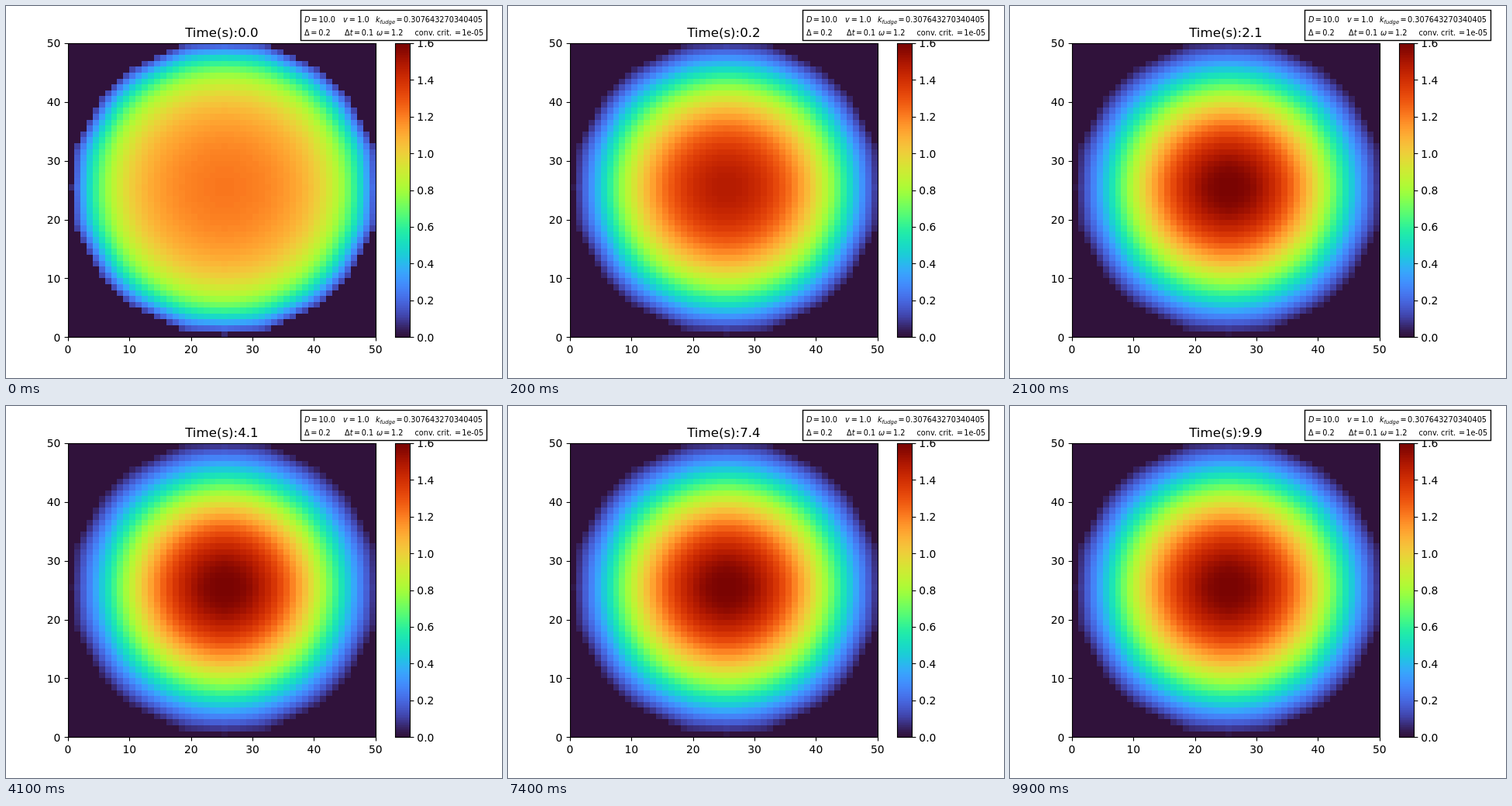
These frames come from a looping animation (640x480 px, 10 s). An HTML page with a canvas:

```html
<!DOCTYPE html>
<html>
<head>
<meta charset="utf-8">
<style>
  html, body { margin: 0; width: 640px; height: 480px; overflow: hidden; background: #fff; }
  canvas { display: block; }
</style>
</head>
<body>
<canvas id="stage" width="640" height="480"></canvas>
<script>
const ctx = document.getElementById('stage').getContext('2d');
const LEFT = 80, RIGHT = 476.8, TOP = 48, BOTTOM = 427.2;
const CELLS = 50, VMAX = 1.6;
const CELL_W = (RIGHT - LEFT) / CELLS, CELL_H = (BOTTOM - TOP) / CELLS;
const BAR_L = 502, BAR_R = 521;

// Turbo colour map, smoothed through evenly spaced stops
const stops = ('30123b 4145ab 4675ed 39a2fc 1bcfd4 24eca6 61fc6c a4fc3b ' +
  'd1e834 f3c63a fe9b2d f36315 d93806 b11901 7a0402').split(' ')
  .map(h => [0, 2, 4].map(i => parseInt(h.slice(i, i + 2), 16)));
const stop = i => stops[Math.max(0, Math.min(stops.length - 1, i))];
const palette = Array.from({ length: 256 }, (_, n) => {
  const x = n / 255 * (stops.length - 1), i = Math.min(Math.floor(x), stops.length - 2), u = x - i;
  const rgb = [0, 1, 2].map(c => {
    const [a, b, d, e] = [-1, 0, 1, 2].map(k => stop(i + k)[c]);
    return Math.round(b + u / 2 * (d - a + u * (2 * a - 5 * b + 4 * d - e + u * (3 * (b - d) + e - a))));
  });
  return `rgb(${rgb})`;
});
const colour = v => palette[Math.max(0, Math.min(255, Math.floor(v / VMAX * 256)))];

// Implicit diffusion in a disc of radius 25 cells, solved by over-relaxation
const W = 53, DT = 0.1, COUPLING = 10 / 0.2 ** 2, OMEGA = 1.7;
const at = (x, y) => (y + 1) * W + x + 1;
const disc = [];
for (let y = 0; y <= 50; y++)
  for (let x = 0; x <= 50; x++)
    if ((x - 25) ** 2 + (y - 25) ** 2 <= 625) disc.push(at(x, y));

function step(old, gain) {
  const phi = old.slice(), diag = 1 / DT + 4 * COUPLING - gain;
  let change = 1;
  for (let n = 0; n < 400 && change > 1e-8; n++) {
    change = 0;
    for (const i of disc) {
      const sum = phi[i - 1] + phi[i + 1] + phi[i - W] + phi[i + W];
      const d = OMEGA * ((old[i] / DT + COUPLING * sum) / diag - phi[i]);
      phi[i] += d;
      change = Math.max(change, Math.abs(d));
    }
  }
  return phi;
}

function run(steps, gain) {
  let phi = new Float64Array(W * W);
  for (const i of disc) phi[i] = 1;
  return Array.from({ length: steps }, () => phi = step(phi, gain));
}

// Adjust the gain so that the final shape neither grows nor decays
const trial = run(20, 2.25), mid = at(25, 25);
const fields = run(24, 2.25 + (trial[18][mid] / trial[19][mid] - 1) / DT);

function text(s, x, y, size, align = 'left', style = '') {
  ctx.font = `${style} ${size}px "DejaVu Sans", sans-serif`;
  ctx.textAlign = align;
  ctx.fillStyle = '#000';
  ctx.fillText(s, x, y);
}

function line(x1, y1, x2, y2) {
  ctx.beginPath();
  ctx.moveTo(x1, y1);
  ctx.lineTo(x2, y2);
  ctx.stroke();
}

function drawField(phi) {
  const px = i => Math.round(LEFT + i * CELL_W), py = j => Math.round(BOTTOM - j * CELL_H);
  for (let j = 0; j < CELLS; j++)
    for (let i = 0; i < CELLS; i++) {
      ctx.fillStyle = colour(phi[at(i, j)]);
      ctx.fillRect(px(i), py(j + 1), px(i + 1) - px(i), py(j) - py(j + 1));
    }
}

function drawAxes() {
  const size = 13.89;
  ctx.strokeStyle = '#000';
  ctx.lineWidth = 1.11;
  ctx.strokeRect(80.5, 48.5, 397, 379);
  for (let k = 0; k <= 5; k++) {
    const x = LEFT + k * 10 * CELL_W, y = BOTTOM - k * 10 * CELL_H;
    const sx = Math.round(x) + 0.5, sy = Math.round(y) + 0.5;
    line(sx, 427.5, sx, 432.4);
    line(75.6, sy, 80.5, sy);
    text(k * 10, x, 448, size, 'center');
    text(k * 10, 70.3, Math.round(y + 5.3), size, 'right');
  }
}

function drawBar() {
  for (let y = TOP; y < 427; y++) {
    ctx.fillStyle = colour((BOTTOM - y - 0.5) / (BOTTOM - TOP) * VMAX);
    ctx.fillRect(BAR_L, y, BAR_R - BAR_L, 1);
  }
  ctx.strokeRect(BAR_L + 0.5, 48.5, BAR_R - BAR_L, 379);
  for (let k = 0; k <= 8; k++) {
    const y = BOTTOM - k * (BOTTOM - TOP) / 8, sy = Math.round(y) + 0.5;
    line(521.5, sy, 526.4, sy);
    text((k * 0.2).toFixed(1), 530.3, Math.round(y + 5.3), 13.89);
  }
}

function drawInfo() {
  const size = 9.72, y1 = 21, y2 = 38;
  ctx.lineWidth = 1.39;
  ctx.fillStyle = '#fff';
  ctx.fillRect(380.5, 5.5, 240, 39);
  ctx.strokeRect(380.5, 5.5, 240, 39);
  const put = (s, x, y) => text(s, x, y, size);
  const math = (s, x, y) => text(s, x, y, size, 'left', 'italic');
  math('D', 385, y1); put('=', 393.8, y1); put('10.0', 403.4, y1);
  math('v', 435, y1); put('=', 442.8, y1); put('1.0', 453.2, y1);
  math('k', 477, y1); text('fudge', 482.6, y1 + 1.6, 6.8, 'left', 'italic');
  put('=', 503.4, y1); put('0.307643270340405', 513, y1);
  put('Δ', 385, y2); put('=', 393.3, y2); put('0.2', 403.3, y2);
  put('Δ', 437, y2); math('t', 443.7, y2); put('=', 448.9, y2); put('0.1', 458.8, y2);
  math('ω', 478, y2); put('=', 487.3, y2); put('1.2', 497, y2);
  put('conv. crit.', 527.5, y2); put('=', 579, y2); put('1e-05', 588.2, y2);
}

function draw(now) {
  const n = Math.floor(now % 10000 / 100);
  ctx.fillStyle = '#fff';
  ctx.fillRect(0, 0, 640, 480);
  drawField(fields[Math.min(n, fields.length - 1)]);
  drawAxes();
  drawBar();
  text('Time(s):' + (n / 10).toFixed(1), 278.4, 40, 16.67, 'center');
  drawInfo();
}

let start;
function tick(now) {
  start ??= now;
  draw(now - start);
  requestAnimationFrame(tick);
}
draw(0);
requestAnimationFrame(tick);
</script>
</body>
</html>
```
